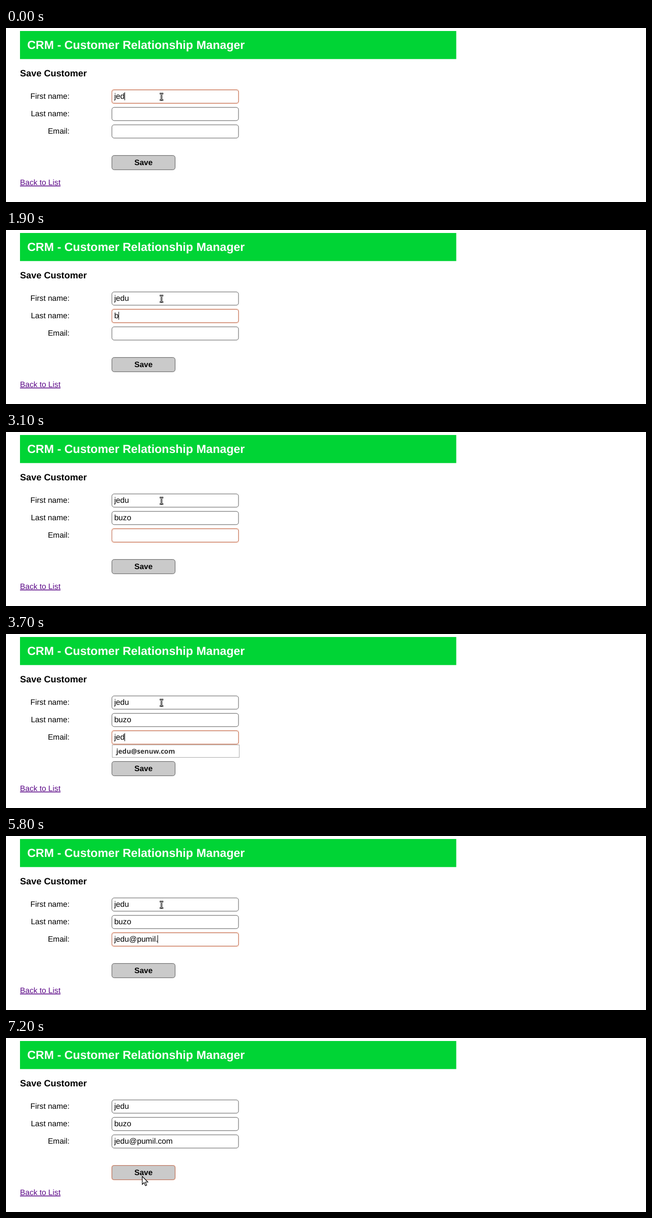
Recreate the animation shown at these times as an HTML page. Size 1280x349 px, loop 8000 ms.

```html
<!DOCTYPE html>
<html lang="en">
<head>
<meta charset="utf-8">
<title>Save Customer</title>
<style>
  html, body { margin: 0; width: 100%; height: 100%; overflow: hidden; background: #fff; }
  svg { display: block; font: 15.68px "Liberation Sans", Arial, sans-serif; text-rendering: geometricPrecision; }
  .bold { font-weight: bold; }
  .label { text-anchor: end; }
  .box { fill: #fff; stroke: #585858; }
  .ring { fill: none; stroke: #f5bda5; visibility: hidden; }
  .focus .box { stroke: #b9664a; }
  .focus .ring { visibility: visible; }
  .button .box { fill: #cacaca; }
  #popup text { font: bold 13.5px "Noto Sans", "Open Sans", sans-serif; fill: #333; }
</style>
</head>
<body>
<svg id="stage" width="1280" height="349" viewBox="0 0 1280 349">
  <rect x="28" y="6" width="872.5" height="56.3" fill="#00d435"/>
  <text class="bold" x="42.4" y="42" font-size="23.52" fill="#fff">CRM - Customer Relationship Manager</text>
  <text class="bold" x="28" y="97" font-size="18.35">Save Customer</text>
  <g id="fields"></g>
  <g class="button" id="button">
    <rect class="ring" x="211.5" y="255.5" width="127" height="29" rx="3"/>
    <rect class="box" x="211.8" y="255.7" width="126.4" height="28.6" rx="4.5"/>
    <text class="bold" x="275" y="275" text-anchor="middle">Save</text>
  </g>
  <text x="28" y="315" fill="#5c0a88" text-decoration="underline">Back to List</text>
  <g id="popup">
    <rect x="212.5" y="222.5" width="254" height="25" fill="#fff" stroke="#aaa"/>
    <text x="220.5" y="240"></text>
  </g>
  <rect id="caret" width="1" height="16"/>
  <g id="beam" fill="none">
    <path id="beamShape" d="M-3.5-6.5H-1.5L0-5.5 1.5-6.5H3.5M0-5.5V5.5M-3.5 6.5H-1.5L0 5.5 1.5 6.5H3.5" stroke="#000" stroke-width="3"/>
    <use href="#beamShape" style="display:none"/>
    <path d="M-3-6.5H-1.5L0-5.5 1.5-6.5H3M0-5.5V5.5M-3 6.5H-1.5L0 5.5 1.5 6.5H3" stroke="#fff"/>
  </g>
  <path id="arrow" d="M.5 .5V16.5L4.2 13 6.8 19.2 9.4 18.1 6.8 12H11.8Z" fill="#fff" stroke="#000" stroke-width="1.2"/>
</svg>
<script>
const LOOP = 8000, STEP = 100, ROW = 35, TEXT_X = 216.4, BUTTON = 3;
const $ = id => document.getElementById(id);

$("fields").innerHTML = ["First name:", "Last name:", "Email:"].map((label, i) => {
  const y = i * ROW;
  return `<text class="label" x="127.2" y="${142 + y}">${label}</text>
    <g class="field">
      <rect class="ring" x="211.5" y="${123.5 + y}" width="254" height="28" rx="3"/>
      <rect class="box" x="211.8" y="${124.2 + y}" width="253.2" height="26.6" rx="4.5"/>
      <text class="value" x="${TEXT_X}" y="${142 + y}"></text>
    </g>`;
}).join("");

const groups = [...document.querySelectorAll(".field"), $("button")];
const values = [...document.querySelectorAll(".value")];
const popupText = $("popup").querySelector("text");
document.querySelector("#beam use").remove();

// Each entry: time, focused control, characters typed.
const actions = [
  [0, 0, "jed"], [100, 0, "u"],
  [500, 1, ""], [1900, 1, "b"], [2100, 1, "u"], [2200, 1, "z"], [2400, 1, "o"],
  [2500, 2, ""], [3300, 2, "j"], [3400, 2, "e"], [3700, 2, "d"], [4000, 2, "u"],
  [4400, 2, "@"], [5000, 2, "p"], [5200, 2, "u"], [5300, 2, "m"], [5500, 2, "i"],
  [5600, 2, "l"], [5800, 2, "."], [6000, 2, "c"], [6100, 2, "o"], [6200, 2, "m"],
  [7200, BUTTON, ""]
];

// Each entry: row, suggestion, time shown, time the fade starts.
const suggestions = [[1, "bel", 2000, 2200], [2, "jedu@senuw.com", 3400, 5000]];

const place = (el, x, y) => el.setAttribute("transform", `translate(${x} ${y})`);
const show = (el, on) => el.style.visibility = on ? "visible" : "hidden";

function drawForm(t) {
  const typed = ["", "", ""];
  let focus = 0, last = 0;
  for (const [at, control, chars] of actions) {
    if (at > t) break;
    focus = control;
    last = at;
    if (control < BUTTON) typed[control] += chars;
  }
  values.forEach((el, i) => el.textContent = typed[i]);
  groups.forEach((el, i) => el.classList.toggle("focus", i === focus));

  const caretOn = focus < BUTTON && (t - last) % 1200 < 600;
  show($("caret"), caretOn);
  if (caretOn) {
    const end = TEXT_X + values[focus].getComputedTextLength();
    place($("caret"), Math.max(217, Math.floor(end)), 129 + focus * ROW);
  }
}

function drawPopup(t) {
  const item = suggestions.find(([, , from, fade]) => t >= from && t < fade + 200);
  show($("popup"), item);
  if (!item) return;
  const [row, text, , fade] = item;
  popupText.textContent = text;
  place($("popup"), 0, (row - 2) * ROW);
  $("popup").style.opacity = t < fade ? 1 : t === fade ? 0.8 : 0.35;
}

function drawPointer(t) {
  const p = Math.min(1, Math.max(0, (t - 6600) / 500));
  const ease = p * p * (3 - 2 * p);
  const x = Math.round(311 - 39 * ease), y = Math.round(137.5 + 139.5 * ease);
  const overField = y < 222 && (y - 123) % ROW < 29;
  place($("beam"), x, y);
  place($("arrow"), x, y);
  show($("beam"), overField);
  show($("arrow"), !overField);
}

function frame() {
  const t = Math.floor(performance.now() % LOOP / STEP) * STEP;
  drawForm(t);
  drawPopup(t);
  drawPointer(t);
  requestAnimationFrame(frame);
}
frame();
</script>
</body>
</html>
```
